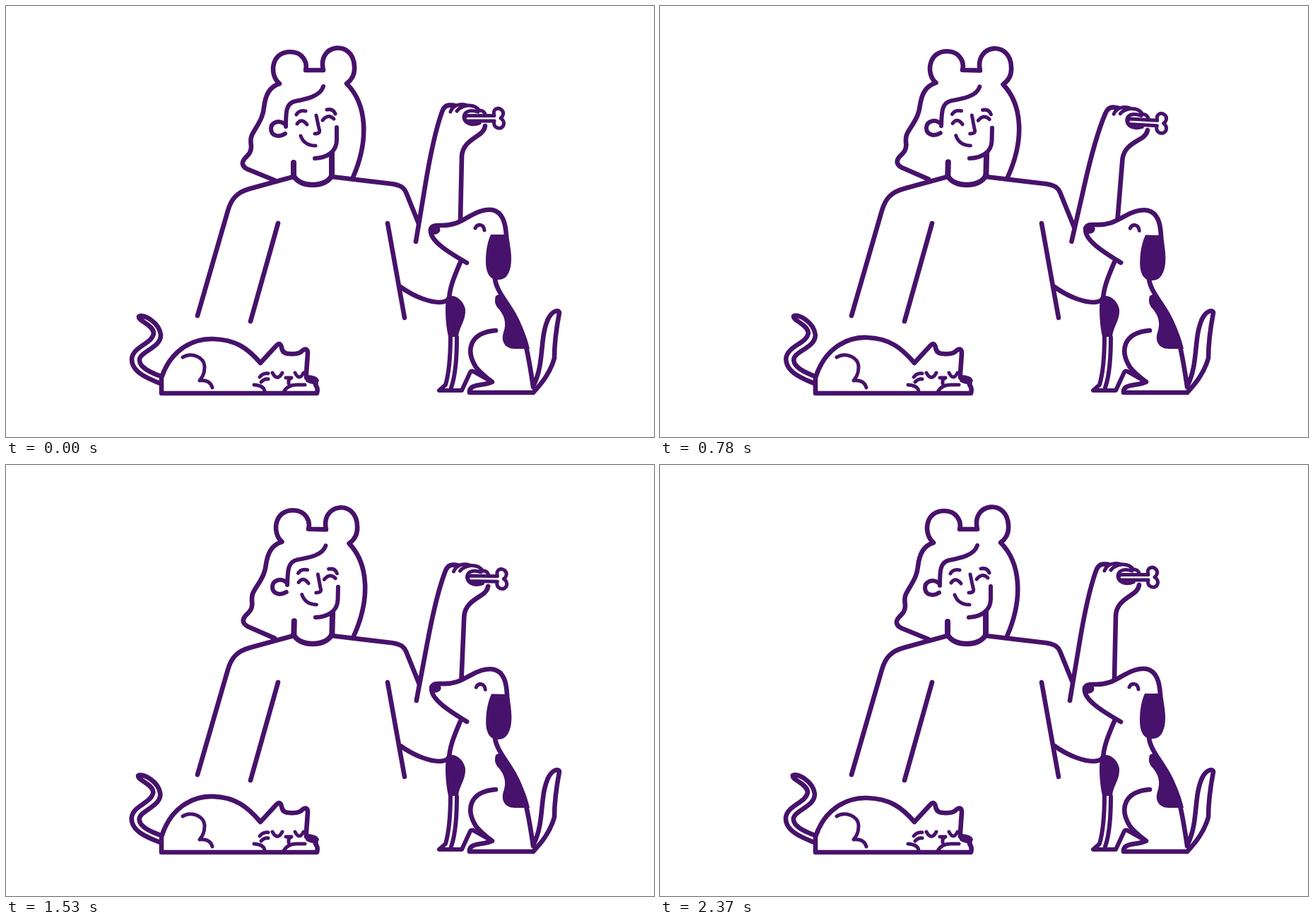
An HTML page that plays this animation: 917x611 px, repeating every 2.4 s.

```html
<!DOCTYPE html>
<html lang="en">
<head>
<meta charset="utf-8">
<title>Treat time</title>
<style>
html, body { margin: 0; width: 100%; height: 100%; overflow: hidden; background: #fff; }
svg { display: block; width: 100vw; height: 100vh; }
.line { fill: none; stroke: #47126b; stroke-width: 6.6; stroke-linecap: round; stroke-linejoin: round; }
.thin { stroke-width: 5; }
.white { fill: #fff; }
.solid { fill: #47126b; stroke: none; }
.mask { fill: #fff; stroke: none; }
</style>
</head>
<body>
<svg viewBox="0 0 917 611" class="line">
  <g id="head">
    <path d="M380 247L341 231C334 227 333 222 338 216C344 210 347 207 347 199C345 185 348 183 353 174C361 161 364 154 365 144C367 127 372 115 387 110C372 98 375 65 402 65C420 65 427 80 424 91H449C440 53 492 47 493 86C494 98 489 105 482 110C511 139 514 190 491 243"/>
    <g class="thin">
      <path d="M449 114C445 128 425 132 409 135C396 138 396 151 396 171" stroke-width="6"/>
      <path d="M394 167C386 161 375 165 375 174C375 184 386 187 395 181" stroke-width="6"/>
      <path d="M411 154Q415 147 424 149M454 147Q463 145 466 153M412 167Q418 158 426 168M448 162Q456 152 464 160M439 155L443 174Q446 181 437 181M417 184Q422 198 438 198"/>
      <path d="M468 172V190C468 207 454 215 437 216" stroke-width="6"/>
    </g>
    <path d="M407 222V243M461 209V243" stroke-width="8"/>
  </g>

  <path class="mask" d="M271 439L314 290C319 273 325 264 345 259L407 241C413 257 455 257 461 241L545 252C560 254 563 258 566 264L583 306L564 442Z"/>
  <path d="M271 439L314 290C319 273 327 264 345 259L407 242M461 242L545 252C560 254 563 258 566 264L587 316M385 308L346 447M540 308L564 442M558 398C580 414 602 420 613 420Q621 420 626 416"/>
  <path d="M407 240C414 258 454 258 461 240" stroke-width="7.5"/>

  <g id="arm">
    <path class="mask" d="M580 334L592 255L616 152L630 140L668 146L678 170L646 212L643 325Z"/>
    <path d="M580 334L592 262C599 218 607 178 617 150Q621 139 630 141M646 306L643 303L645 213C646 196 660 189 670 182Q677 177 678 170"/>
    <g class="thin">
      <path d="M623 142Q629 138 637 141Q631 144 629 150M637 141Q646 138 653 141Q642 143 638 149M653 141Q664 140 670 148Q676 148 678 153M668 150C654 146 648 151 648 158C649 167 660 170 670 166"/>
      <path class="white" d="M652 155.5H691C688 146 696 143 701 147C706 151 703 157 700 159C706 163 706 170 700 173C694 174 689 170 691 163H652Q646 159 652 155.5Z"/>
    </g>
  </g>

  <g id="dog">
    <path class="mask" d="M643 363L627 418L629 468L622 538L613 545H746L718 437L692 388Z"/>
    <path d="M643 363C635 382 627 400 627 418M692 387C694 403 707 417 719 438C734 465 739 492 746 540M746 548H656C655 535 675 539 688 533C680 527 671 520 665 512C650 488 656 463 693 460M747 537C762 507 755 470 767 444C773 431 783 430 783 435C779 456 776 476 776 499C770 521 757 536 746 548"/>
    <path d="M629 467C629 495 627 520 622 537L613 545H645L657 519Q659 516 663 519L686 532M638 470C638 496 637 521 630 541" stroke-width="6"/>
    <path class="solid" d="M623 413C633 407 647 415 650 430C651 446 641 455 640 469H626C622 451 621 431 623 413ZM693 411Q690 420 695 427C705 437 709 449 704 463C700 475 706 486 720 486H741C737 465 722 434 701 407Z"/>
  </g>
  <g id="snout">
    <path class="mask" d="M600 318Q600 310 612 311L655 299L688 289L707 310L708 330L695 380L652 364Z"/>
    <path d="M652 364C624 348 601 333 601 319C601 311 607 311 614 311C637 312 648 302 658 297C670 290 680 288 688 289C703 292 707 308 708 326"/>
    <path class="thin" d="M664 315C667 308 676 309 677 318"/>
    <ellipse class="solid" cx="606" cy="317" rx="8.5" ry="7"/>
    <path class="solid" d="M686 324H711C713 340 717 355 714 370C711 384 704 389 695 388C684 388 679 377 679 362C679 345 682 333 686 324Z"/>
  </g>

  <path id="tail" class="white" d="M222 526C202 519 190 512 189 503C187 490 220 485 219 466C217 449 195 436 188 440C186 446 209 452 209 464C207 479 180 482 178 500C177 520 204 529 218 535"/>
  <g id="cat">
    <path id="back" class="white"/>
    <path class="thin" d="M250 498C263 490 281 498 281 512C281 522 277 527 274 531C285 530 290 534 292 541"/>
    <path class="thin" stroke-width="4.5" d="M377 520Q384 533 391 520M409 520Q415 532 421 520M396 527H404L400 530V535M359 526Q364 520 371 521M361 533Q366 528 371 529M351 537Q365 538 366 546M393 547Q398 537 412 537H423"/>
    <path class="solid" d="M424 523Q441 523 443 531L440 537Q429 536 424 532Z"/>
  </g>
</svg>
<script>
const LOOP = 2400, STEP = 30;
const el = id => document.getElementById(id);
const [head, arm, snout, tail, back] = ['head', 'arm', 'snout', 'tail', 'back'].map(el);

const ease = (t, a, b) => {
  const u = Math.min(1, Math.max(0, (t - a) / (b - a)));
  return (1 - Math.cos(Math.PI * u)) / 2;
};
// rises over a..b, rests, falls over c..d
const swing = (t, a, b, c, d) => ease(t, a, b) - ease(t, c, d);
const turn = (node, deg, x, y) => node.setAttribute('transform', `rotate(${deg.toFixed(3)} ${x} ${y})`);

function draw(t) {
  const nod = swing(t, 360, 1180, 1180, 1900);
  const wave = swing(t, 340, 900, 1180, 1740);
  turn(head, 2.65 * nod, 437, 255);
  turn(arm, 3.8 * wave, 583, 375);
  turn(snout, 2.5 * nod, 660, 372);
  turn(tail, 0.8 * Math.sin(2 * Math.PI * t / LOOP), 220, 530);

  const y = 472 - 4 * nod;
  back.setAttribute('d', `M220 549V527C232 ${y + 18} 262 ${y - 1} 293 ${y}C325 ${y + 1} 342 485 360 506` +
    'L383 481Q388 476 390 484Q391 493 401 493C410 494 416 493 420 488Q427 484 427 492L425 521V527Q441 531 438 537Q442 542 440 549Z');
}

function tick(now) {
  draw(Math.floor(now % LOOP / STEP) * STEP);
  requestAnimationFrame(tick);
}
draw(0);
requestAnimationFrame(tick);
</script>
</body>
</html>
```
